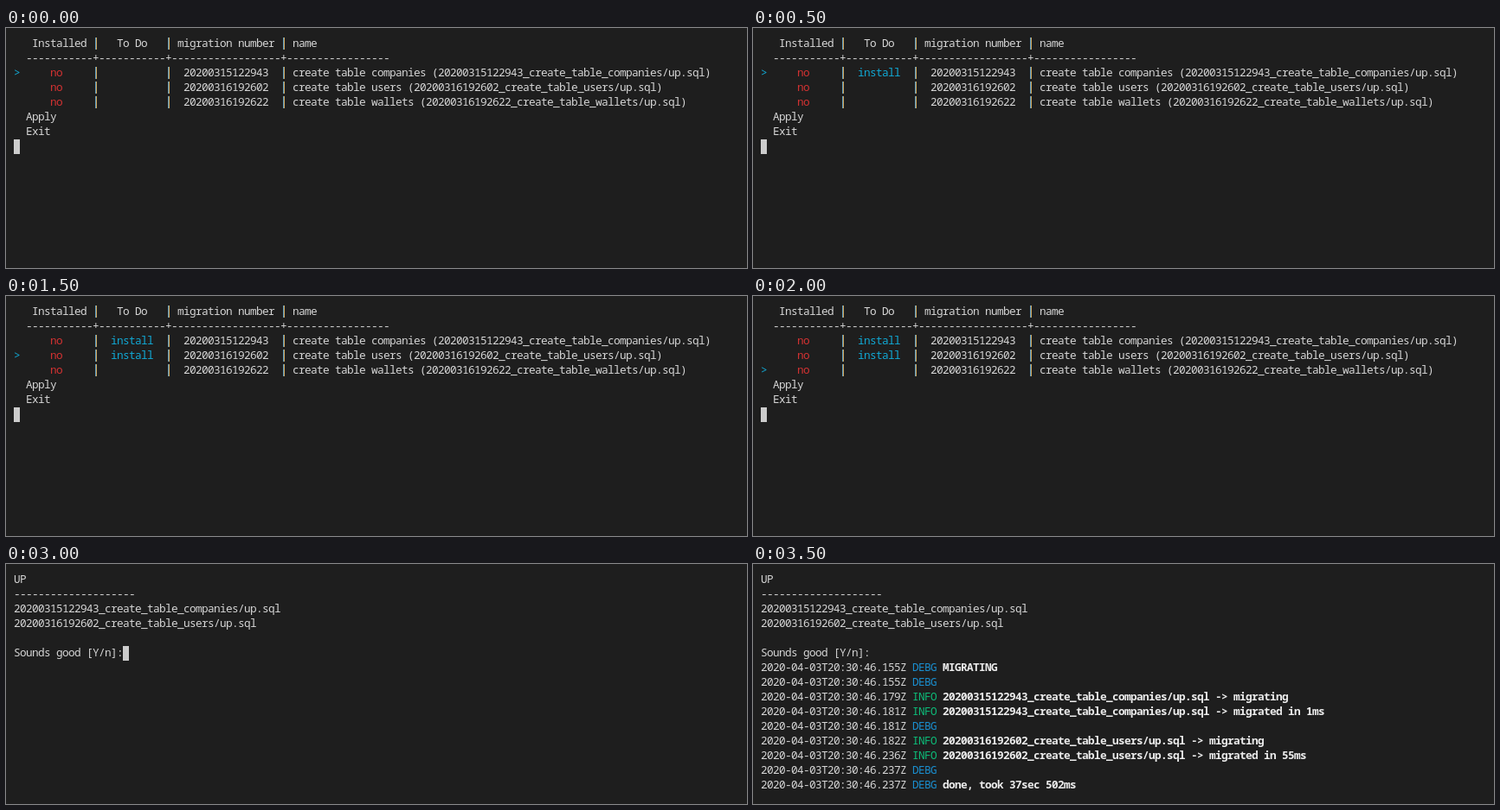
An HTML page with a canvas that plays this animation: 856x278 px, repeating every 4 s.

```html
<!DOCTYPE html>
<html lang="en">
<head>
<meta charset="utf-8">
<title>Migration prompt</title>
<style>
  html, body { margin: 0; width: 100%; height: 100%; overflow: hidden; background: #1e1e1e; }
  canvas { display: block; }
</style>
</head>
<body>
<canvas id="terminal" width="856" height="278"></canvas>
<script>
const ctx = document.getElementById('terminal').getContext('2d', { alpha: false });
const LEFT = 9, TOP = 10, CELL = 7, LINE = 17, BASELINE = 12;
const FONT = '12.75px "Noto Sans Mono", "DejaVu Sans Mono", monospace';
const STEP = 500, LOOP = 4000;
const BACK = '#1e1e1e', FORE = '#d6d6d6', CARET = '#cccccc', WHITE = '#ececec';
const RED = '#d23232', GREEN = '#0dbc79', CYAN = '#11a8d4', BLUE = '#1a8fd0';

const script = (stamp, table) => `${stamp}_create_table_${table}/up.sql`;
const migrations = [
  ['20200315122943', 'companies'],
  ['20200316192602', 'users'],
  ['20200316192622', 'wallets'],
];
const files = migrations.slice(0, 2).map(m => script(...m));

const log = [
  ['155', 'DEBG', 'MIGRATING'],
  ['155', 'DEBG', ''],
  ['179', 'INFO', files[0] + ' -> migrating'],
  ['181', 'INFO', files[0] + ' -> migrated in 1ms'],
  ['181', 'DEBG', ''],
  ['182', 'INFO', files[1] + ' -> migrating'],
  ['236', 'INFO', files[1] + ' -> migrated in 55ms'],
  ['237', 'DEBG', ''],
  ['237', 'DEBG', 'done, took 37sec 502ms'],
];

// Each character sits at the left of its own grid cell, as in a terminal
function put(col, row, text, color = FORE, weight = 500) {
  ctx.font = `${weight} ${FONT}`;
  ctx.fillStyle = color;
  [...text].forEach((char, i) =>
    ctx.fillText(char, LEFT + (col + i) * CELL, TOP + row * LINE + BASELINE));
}

function fillCell(col, row, color, x, y, w, h) {
  ctx.fillStyle = color;
  ctx.fillRect(LEFT + col * CELL + x, TOP + row * LINE + y, w, h);
}

const caret = (col, row) => fillCell(col, row, CARET, 0, 0, CELL, LINE);

// Column rules have a cool left edge and a warm right edge
function rules(row) {
  for (const col of [13, 25, 44]) {
    fillCell(col, row, '#5b9ac0', 3, 1, 1, 14);
    fillCell(col, row, '#d0a75c', 4, 1, 1, 14);
  }
}

function drawMenu(selected, installs) {
  put(3, 0, 'Installed');
  put(17, 0, 'To Do');
  put(27, 0, 'migration number');
  put(46, 0, 'name');
  rules(0);
  put(2, 1, [11, 11, 18, 17].map(n => '-'.repeat(n)).join('+'));
  migrations.forEach(([stamp, table], i) => {
    const row = i + 2;
    put(6, row, 'no', RED);
    if (i < installs) put(16, row, 'install', CYAN);
    put(28, row, stamp);
    put(46, row, `create table ${table} (${script(stamp, table)})`);
    rules(row);
  });
  put(2, 5, 'Apply');
  put(2, 6, 'Exit');
  put(0, selected + 2, '>', CYAN);
  caret(0, 7);
}

function drawConfirm(accepted) {
  put(0, 0, 'UP');
  put(0, 1, '-'.repeat(20));
  files.forEach((file, i) => put(0, i + 2, file));
  put(0, 5, 'Sounds good [Y/n]:');
  if (!accepted) return caret(18, 5);
  log.forEach(([ms, level, message], i) => {
    put(0, i + 6, `2020-04-03T20:30:46.${ms}Z`);
    put(25, i + 6, level, level === 'INFO' ? GREEN : BLUE);
    put(30, i + 6, message, WHITE, 700);
  });
}

// Selected line and number of marked migrations at each key press
const menuSteps = [[0, 0], [0, 1], [1, 1], [1, 2], [2, 2], [3, 2]];
let shown = -1;

function frame() {
  const step = Math.floor(performance.now() % LOOP / STEP);
  if (step !== shown) {
    shown = step;
    ctx.fillStyle = BACK;
    ctx.fillRect(0, 0, 856, 278);
    if (step < menuSteps.length) drawMenu(...menuSteps[step]);
    else drawConfirm(step > menuSteps.length);
  }
  requestAnimationFrame(frame);
}
frame();
</script>
</body>
</html>
```
